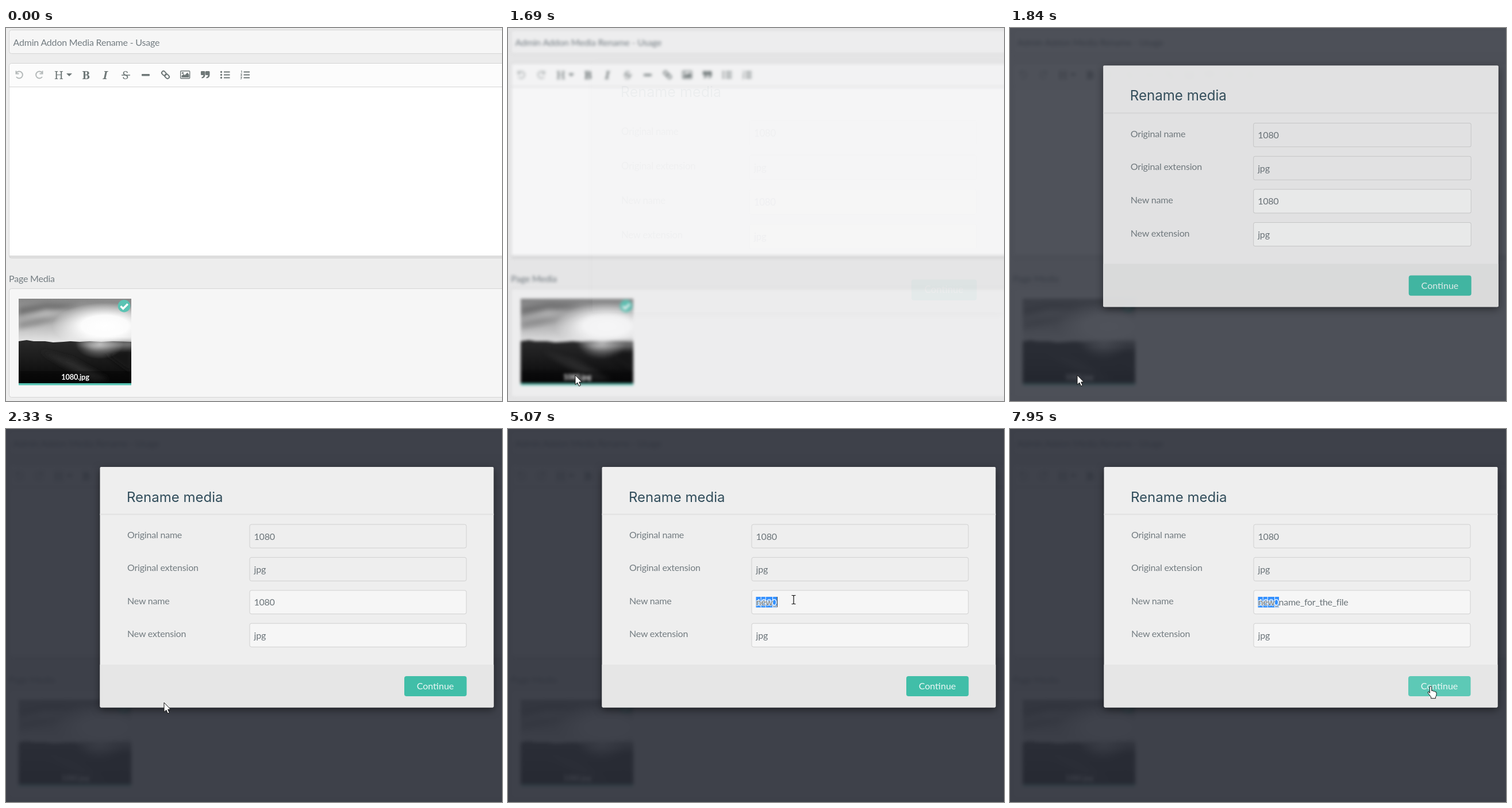
An HTML page that plays this animation: 863x649 px, repeating every 8000 ms.

```html
<!DOCTYPE html>
<html lang="en">
<head>
<meta charset="utf-8">
<title>Rename media</title>
<style>
  html, body { margin: 0; width: 100%; height: 100%; overflow: hidden; background: #ededed; }
  svg { display: block; }
  text { font: 16px Lato, sans-serif; letter-spacing: -.2px; fill: #737c81; white-space: pre; }
  .box { fill: #f6f6f6; stroke: #d5d5d5; }
  .icon { fill: #6f7878; stroke: none; }
  .line { fill: none; stroke: #6f7878; stroke-width: 2; }
  .dim { stroke: #b4b9b9; }
  .serif { font: 20px "Noto Serif", serif; fill: #6f7878; }
  .title { font: 24px Inter, sans-serif; letter-spacing: 0; fill: #314d5b; }
  .file { font: 700 12.8px Lato, sans-serif; fill: #fff; text-anchor: middle; }
  .value { fill: #6b7479; }
  #typed { letter-spacing: -.28px; stroke: #f6f6f6; stroke-width: 1.6px; paint-order: stroke; }
  #panel { filter: drop-shadow(0 4px 7px rgba(0, 0, 0, .5)); }
  .cursor { fill: #fff; stroke: #111; stroke-linejoin: round; }
</style>
</head>
<body>
<svg width="863" height="649" viewBox="0 0 863 649">
  <defs>
    <linearGradient id="sky" x2="0" y2="1">
      <stop offset="0" stop-color="#868686"/>
      <stop offset=".45" stop-color="#a8a8a8"/>
      <stop offset="1" stop-color="#e6e6e6"/>
    </linearGradient>
    <linearGradient id="land" x2="0" y2="1">
      <stop offset="0" stop-color="#2a2a2a"/>
      <stop offset=".4" stop-color="#1c1c1c"/>
      <stop offset="1" stop-color="#060606"/>
    </linearGradient>
    <radialGradient id="sun">
      <stop offset="0" stop-color="#fff"/>
      <stop offset=".45" stop-color="#fff" stop-opacity=".95"/>
      <stop offset="1" stop-color="#fff" stop-opacity="0"/>
    </radialGradient>
    <radialGradient id="glow">
      <stop offset="0" stop-color="#fff" stop-opacity=".55"/>
      <stop offset="1" stop-color="#fff" stop-opacity="0"/>
    </radialGradient>
    <filter id="soft"><feGaussianBlur stdDeviation="4"/></filter>
    <clipPath id="photo"><path d="M22 471H218V618H22Z"/></clipPath>
  </defs>

  <rect width="863" height="649" fill="#ededed"/>
  <g id="page">
    <rect class="box" x="5.5" y="3.5" width="900" height="41" rx="4"/>
    <text x="12.5" y="30.5">Admin Addon Media Rename - Usage</text>

    <rect class="box" x="5.5" y="61.5" width="900" height="339" rx="4" style="fill:#e6e6e6"/>
    <path d="M6 66q0-4 4-4H900V102H6Z" fill="#fcfcfc"/>
    <path d="M6 103H900V396H6Z" fill="#fff"/>
    <path d="M6 102.5H900M6 396.5H900M6 398.5H900" stroke="#d5d5d5"/>

    <path class="line dim" d="M18 78a6 6 0 1 1 0 7M17.500 74.500v5h5M63 78a6 6 0 1 0 0 7M63.500 74.500v5h-5"/>
    <text class="serif" x="84" y="88.500">H</text>
    <path class="icon" d="M105 79h10l-5 5Z"/>
    <text class="serif" x="132.500" y="88.500" style="font-weight:700">B</text>
    <text class="serif" x="168.500" y="88.500" style="font-style:italic;font-weight:600">I</text>
    <text class="serif" x="202.500" y="88.500">S</text>
    <path class="line" d="M201 82H216" style="stroke-width:1.500"/>
    <rect class="icon" x="236" y="80" width="14" height="3.500" rx="1"/>
    <g class="line" transform="rotate(45 277.500 81.500)">
      <rect x="269.500" y="78.500" width="8.500" height="6" rx="3"/>
      <rect x="277" y="78.500" width="8.500" height="6" rx="3"/>
    </g>
    <rect class="line" x="303.700" y="74.700" width="16" height="13" rx="1" style="stroke-width:1.400"/>
    <path class="icon" d="M305.500 86v-3l3.500-3 2 2 4.500-4.500 3 3.500v5Z"/>
    <circle class="icon" cx="307.500" cy="78.300" r="1.600"/>
    <path id="quote" class="icon" d="M340 75h5q1.500 0 1.500 1.500v5q0 5.500-6 6v-2q3-.5 3-3.500h-3q-1.500 0-1.500-1.500v-4Q339 75 340 75Z"/>
    <use href="#quote" x="8"/>
    <path id="bars" class="line" d="M379 76.500h10.500M379 81.500h10.500M379 86.500h10.500"/>
    <use href="#bars" x="34.500"/>
    <path class="line" d="M374.500 76.500h0M374.500 81.500h0M374.500 86.500h0" stroke-linecap="round" style="stroke-width:3.400"/>
    <path class="line" d="M409 75l1-.7v4M408 80h2.500l-2 3h2.500M408 85.500h2.500l-1.500 1.500q2 1.500-1 2" style="stroke-width:1"/>

    <text x="5" y="441.500">Page Media</text>
    <rect class="box" x="5.500" y="453.500" width="900" height="189" rx="4"/>
    <g clip-path="url(#photo)">
      <rect x="22" y="471" width="196" height="76" fill="url(#sky)"/>
      <g filter="url(#soft)">
        <path d="M22 486L70 478 130 480 95 490 22 500Z" fill="#727272"/>
        <path d="M22 512L60 503 95 506 55 517 22 523Z" fill="#909090"/>
        <path d="M22 503L70 491 110 494 60 503Z" fill="#bdbdbd"/>
        <path d="M120 471H218V480L170 478Z" fill="#8c8c8c"/>
      </g>
      <ellipse cx="172" cy="518" rx="92" ry="40" fill="url(#sun)"/>
      <path d="M22 545l14-2 12 2 20 0 14 2 18-1 12-1 16 1 18-1 20 1 20-1 32 1V618H22Z" fill="url(#land)"/>
      <g filter="url(#soft)">
        <path d="M60 562L115 576 180 612 150 614 95 584Z" fill="#2c2c2c"/>
        <path d="M120 548L222 545V555L150 557Z" fill="#858585"/>
        <path d="M172 566L218 559V600Z" fill="#141414"/>
      </g>
      <ellipse cx="163" cy="550" rx="42" ry="26" fill="url(#glow)"/>
      <path d="M22 597H218V618H22Z" fill-opacity=".35"/>
    </g>
    <text class="file" x="120.500" y="611.500">1080.jpg</text>
    <rect x="22" y="618" width="196" height="3.500" fill="#55c2b1"/>
    <circle cx="205.500" cy="483.700" r="10.800" fill="#5bc3b3"/>
    <path d="M199.500 484l4.300 4.300 8-8" fill="none" stroke="#fff" stroke-width="3.400"/>
  </g>

  <rect id="overlay" width="863" height="649" fill="#2b2e38" fill-opacity=".9"/>

  <g id="dialog">
    <rect id="panel" x="163.500" y="66" width="685" height="418.500" rx="2" fill="#eee"/>
    <path d="M163.500 410h685v72.500q0 2-2 2h-681q-2 0-2-2Z" fill="#e6e6e6"/>
    <path d="M163.500 148.500h685" stroke="#e3e3e3" stroke-width="2.500"/>
    <text class="title" x="210" y="127">Rename media</text>
    <g id="rows"></g>
    <g id="select">
      <rect x="431.500" y="292" width="36.500" height="18.500" fill="#3390ff"/>
      <text x="431.500" y="307" style="fill:#fff">1080</text>
      <path id="gaps" stroke="#f6f6f6" stroke-width="1"/>
    </g>
    <text id="typed" class="value" x="431.500" y="307.300"></text>
    <path id="caret" stroke="#444" stroke-width="1"/>
    <rect id="button" x="693" y="430" width="108.500" height="35" rx="4"/>
    <text x="747" y="453" text-anchor="middle" style="fill:#ecf8f6;letter-spacing:0">Continue</text>
  </g>

  <path id="arrow" class="cursor" d="M0 0V16.500L3.800 13 6.500 19 9.300 17.800 6.700 12H11.500Z"/>
  <path id="beam" d="M-3.500-7.500h2.500l1 1 1-1h2.500M-3.500 7.500h2.500l1-1 1 1h2.500M0-6.500v13" fill="none" stroke="#111" stroke-width="1.200"/>
  <path id="hand" class="cursor" d="M-1.700 1.500q0-1.800 1.700-1.800t1.700 1.800v6q2.500-.8 3 .7 2.300-.5 2.800 1 2.500-.3 2.500 2v3q0 2-1.500 4v2.500h-8v-2.500l-5-6.500q-1.200-2 .3-2.500t2.500 2.300Z"/>
</svg>
<script>
const LOOP = 8000;
const $ = id => document.getElementById(id);

// Dialog rows: label, value, read-only
[['Original name', '1080', 1], ['Original extension', 'jpg', 1],
 ['New name', '', 0], ['New extension', 'jpg', 0]].forEach(([label, value, locked], i) => {
  const y = 166 + i * 57.4;
  $('rows').innerHTML += `<text x="211" y="${y + 24}">${label}</text>
    <rect x="424" y="${y}" width="377" height="41" rx="3" stroke="#d0d0d0" fill="${locked ? '#eee' : '#f6f6f6'}"/>
    <text class="value" x="431.500" y="${y + 26.5}">${value}</text>`;
});

// time, blur radius, dialog progress
const OPEN = [[0, 0, 0], [1610, 1.2, 0], [1690, 2.8, .045], [1770, 3, .57], [1840, 3, .92], [2010, 3, 1]];

// time, length of the text typed so far
const NAME = 'new_name_for_the_file';
const KEYS = [[0, 0], [3970, 1], [4040, 2], [4120, 3], [4900, 5], [5070, 4], [5240, 3],
  [5390, 4], [5470, 5], [5550, 6], [5700, 7], [5780, 8], [5850, 9], [6020, 10], [6090, 11],
  [6160, 12], [6310, 13], [6390, 14], [6540, 15], [6620, 16], [6710, 17], [6790, 18],
  [6940, 19], [7090, 20], [7170, 21]];

// start, end, steps, from, to
const MOVES = [
  [130, 910, 11, [528, 406], [117, 604]],
  [2010, 2710, 10, [117, 604], [497, 297]],
  [7440, 7950, 8, [497, 297], [732, 448]]
];

const current = (table, t) => table.filter(row => row[0] <= t).pop();
const ease = p => p * p * (3 - 2 * p);

function pointer(t) {
  const move = current(MOVES, t);
  if (!move) return null;
  const [start, end, steps, from, to] = move;
  const step = Math.floor((t - start) / (end - start) * (steps - 1) + 1e-6);
  const p = ease(Math.min(1, step / (steps - 1)));
  return from.map((v, i) => v + (to[i] - v) * p);
}

function show(id, on) {
  $(id).style.display = on ? '' : 'none';
}

function drawDialog(t) {
  const [, blur, p] = current(OPEN, t);
  $('page').style.filter = blur ? `blur(${blur}px)` : 'none';
  $('overlay').style.opacity = $('dialog').style.opacity = p;
  const scale = 1.05 - .05 * p;
  $('dialog').setAttribute('transform', `translate(506 275.250) scale(${scale}) translate(-506 -275.250)`);
}

function drawField(t) {
  const count = current(KEYS, t)[1];
  const typed = $('typed');
  const selected = t >= 3030;
  typed.textContent = selected ? NAME.slice(0, count) : '1080';
  show('select', selected);
  const edge = n => 431.5 + (n ? typed.getSubStringLength(0, n) : 0);
  let gaps = '';
  for (let n = 1; n <= Math.min(3, selected ? count : 0); n++) gaps += `M${edge(n)} 292v18.500`;
  $('gaps').setAttribute('d', gaps);
  show('caret', count && t < 7670);
  $('caret').setAttribute('d', `M${Math.round(edge(count)) + .5} 292v18`);
}

function drawPointer(t) {
  const at = pointer(t);
  const [x, y] = at || [0, 0];
  const inside = (l, top, r, b) => t > 2010 && x > l && x < r && y > top && y < b;
  const overButton = inside(693, 430, 801, 465);
  const overField = inside(424, 280, 801, 322) || inside(424, 338, 801, 379);
  const kind = !at ? '' : overButton ? 'hand' : overField ? 'beam' : 'arrow';
  for (const id of ['arrow', 'beam', 'hand']) {
    show(id, id === kind);
    $(id).setAttribute('transform', `translate(${Math.round(x)} ${Math.round(y)})`);
  }
  $('button').setAttribute('fill', overButton ? '#5dc9b6' : '#41bea8');
}

const begin = performance.now();
function frame(now) {
  const t = Math.max(0, now - begin) % LOOP;
  drawDialog(t);
  drawField(t);
  drawPointer(t);
  requestAnimationFrame(frame);
}
frame(begin);
</script>
</body>
</html>
```
